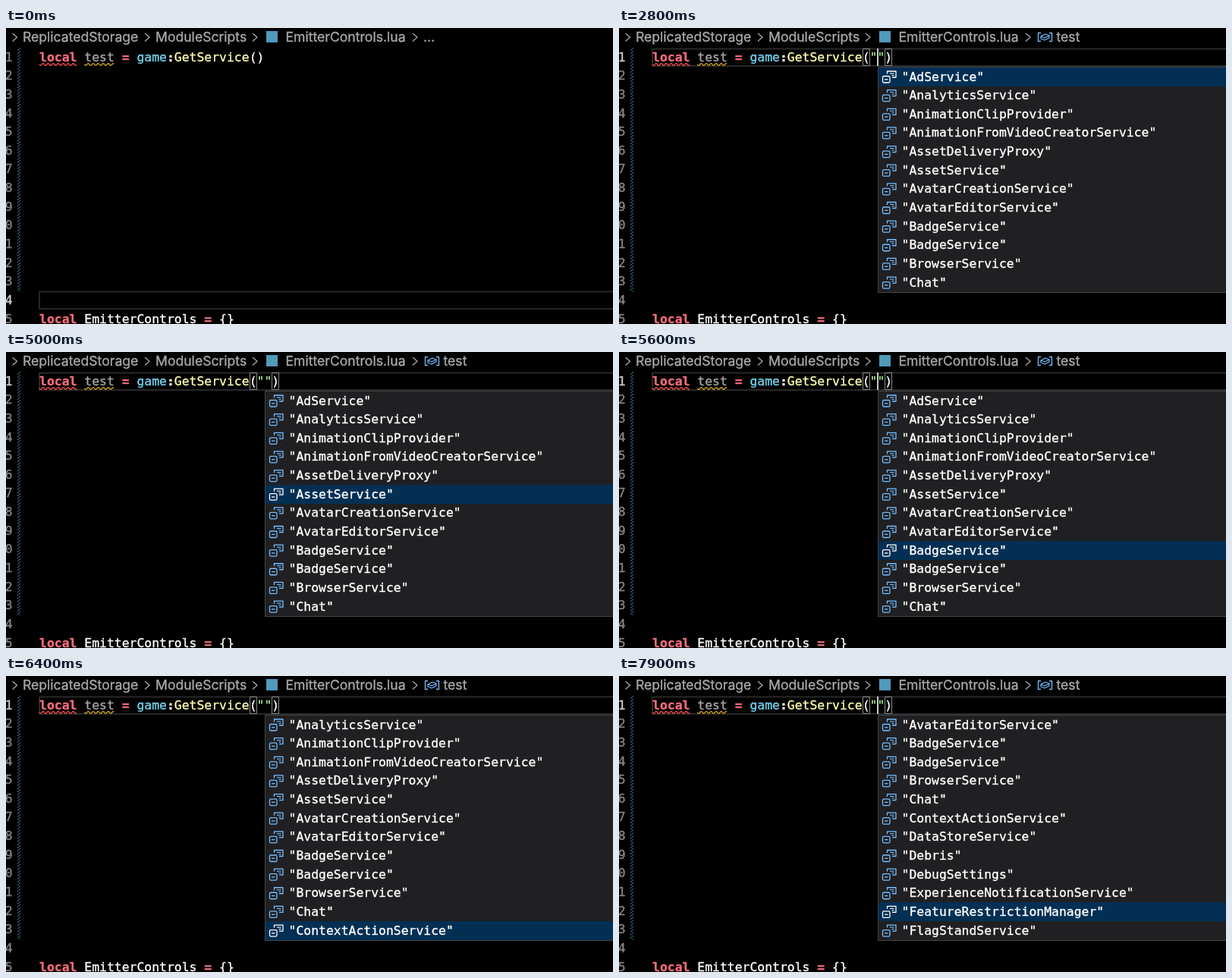
Animation, 800 px wide and 390 px high, one loop 8 s. Source, as an HTML page with a canvas:

```html
<!DOCTYPE html>
<html lang="en">
<head>
<meta charset="utf-8">
<title>Service autocomplete</title>
<style>
html, body { margin: 0; width: 100%; height: 100%; overflow: hidden; background: #000; }
canvas { display: block; }
</style>
</head>
<body>
<canvas id="stage" width="800" height="390"></canvas>
<script>
const ctx = document.getElementById('stage').getContext('2d');
const LOOP = 8000, ROW = 24.64, CHAR = 9.88, CODE_X = 44, TOP = 26, VISIBLE = 12;
const MONO = '16.41px "DejaVu Sans Mono", monospace';
const SANS = '17.6px Inter, sans-serif';
const PINK = '#f86d7c', BLUE = '#75beff', GREY = '#a9a9a9';
const CLICK = 1250, STEP_LEFT = 2100, QUOTE = 2450, MENU = 2550;

const services = ['AdService', 'AnalyticsService', 'AnimationClipProvider',
  'AnimationFromVideoCreatorService', 'AssetDeliveryProxy', 'AssetService',
  'AvatarCreationService', 'AvatarEditorService', 'BadgeService', 'BadgeService',
  'BrowserService', 'Chat', 'ContextActionService', 'DataStoreService', 'Debris',
  'DebugSettings', 'ExperienceNotificationService', 'FeatureRestrictionManager',
  'FlagStandService'];

const column = n => CODE_X + n * CHAR;
const rowTop = n => TOP + n * ROW;

// A hairline stroke gives the glyphs their slightly heavy weight.
function text(str, x, y, color, font = MONO) {
  ctx.font = font;
  ctx.fillStyle = ctx.strokeStyle = color;
  ctx.lineWidth = 0.35;
  ctx.fillText(str, x, y);
  ctx.strokeText(str, x, y);
}

function line(points, color, width = 1.5, close = false) {
  ctx.beginPath();
  points.forEach(([x, y]) => ctx.lineTo(x, y));
  if (close) ctx.closePath();
  ctx.strokeStyle = color;
  ctx.lineWidth = width;
  ctx.stroke();
}

function frame(x, y, w, h, color, width = 1, radius = 0) {
  ctx.beginPath();
  ctx.roundRect(x, y, w, h, radius);
  ctx.strokeStyle = color;
  ctx.lineWidth = width;
  ctx.stroke();
}

function code(row, parts) {
  let col = 0;
  for (const [str, color, bold] of parts) {
    text(str, column(col), rowTop(row) + 17.6, color, (bold ? 'bold ' : '') + MONO);
    col += str.length;
  }
}

function squiggle(from, to, color) {
  const points = [];
  for (let x = column(from); x <= column(to); x += 1) {
    points.push([x, 48 + 1.4 * Math.sin((x - CODE_X) * Math.PI / 3.3)]);
  }
  line(points, color, 1.4);
}

function breadcrumb(clicked) {
  for (const x of [8.5, 183, 325, 536]) {
    line([[x, 7], [x + 6, 12.2], [x, 17.4]], GREY, 1.3);
  }
  text('ReplicatedStorage', 22, 18, GREY, SANS);
  text('ModuleScripts', 197, 18, GREY, SANS);
  ctx.fillStyle = '#519aba';
  ctx.fillRect(343, 4, 15, 15);
  text('EmitterControls.lua', 368.5, 18, GREY, SANS);
  if (!clicked) return text('…', 550, 18, GREY, SANS);

  line([[556, 6.5], [552.5, 6.5], [552.5, 17.5], [556, 17.5]], BLUE, 1.3);
  line([[567, 6.5], [570.5, 6.5], [570.5, 17.5], [567, 17.5]], BLUE, 1.3);
  line([[556, 11], [562, 8], [567, 10], [567, 13], [561, 16], [556, 14]], BLUE, 1.2, true);
  line([[556, 11], [561, 13], [567, 10]], BLUE, 1.2);
  text('test', 576.5, 18, GREY, SANS);
}

function gutter(activeRow) {
  ctx.textAlign = 'right';
  for (let i = 0; i < 15; i++) {
    text(String(i + 1), 8.7, rowTop(i) + 17.6, i === activeRow ? '#d0d0d0' : '#858585');
  }
  ctx.textAlign = 'left';

  ctx.save();
  ctx.beginPath();
  ctx.rect(15, TOP, 4, 321);
  ctx.clip();
  for (let y = TOP; y < 354; y += 4.1) line([[14, y + 1], [20, y - 5]], '#438fb3', 1);
  ctx.restore();
}

function entryIcon(y, color) {
  line([[353.5, 60.5 + y], [353.5, 57 + y], [365, 57 + y], [365, 65 + y], [360, 65 + y]], color, 1.3);
  line([[357, 60 + y], [362.5, 60 + y]], color, 1.1);
  line([[359.5, 62.5 + y], [362.5, 62.5 + y]], color, 1.1);
  frame(347.5, 63.5 + y, 9.5, 8.5, color, 1.3, 1.5);
  line([[350, 67.8 + y], [354.5, 67.8 + y]], color, 1.3);
}

// Steady key presses, then faster ones, and finally one press back up.
function selectedAt(t) {
  if (t < 4000) return 0;
  if (t < 6200) return 1 + Math.floor((t - 4000) / 220);
  if (t >= 7500) return 17;
  return Math.min(18, 11 + Math.floor((t - 6200) / 125));
}

function menu(t) {
  const selected = selectedAt(t);
  const first = Math.max(0, (t < 7500 ? selected : 18) - VISIBLE + 1);
  ctx.fillStyle = '#202023';
  ctx.fillRect(341, 51, 460, 298);
  for (let i = 0; i < VISIBLE; i++) {
    const y = i * ROW, current = first + i === selected;
    if (current) {
      ctx.fillStyle = '#022f53';
      ctx.fillRect(342, Math.round(51.6 + y), 458, 25);
    }
    entryIcon(y, current ? '#fff' : BLUE);
    text(`"${services[first + i]}"`, 372.5, 69.5 + y, '#fff');
  }
  frame(341.5, 51.5, 460, 297, '#454548');
}

function pointer(t) {
  if (t < 600 || t >= QUOTE) return;
  const p = Math.min(1, (t - 600) / 550), left = (1 - p) ** 3;
  ctx.save();
  ctx.translate(441 + 110 * left, 33 + 358 * left);
  const outline = [[0, 0], [0, 20], [4.5, 16], [8, 24], [11.5, 22.5], [8.2, 14.8], [14, 14.5]];
  line(outline, '#fff', 2.4, true);
  ctx.fillStyle = '#000';
  ctx.fill();
  ctx.restore();
}

function caret(t) {
  const clicked = t >= CLICK;
  const start = t >= QUOTE ? QUOTE : t >= STEP_LEFT ? STEP_LEFT : clicked ? CLICK : -900;
  if ((t - start) % 1000 >= 500) return;
  const col = !clicked ? 0 : t < STEP_LEFT ? 30 : t < QUOTE ? 29 : 30;
  ctx.fillStyle = '#c8c8c8';
  ctx.fillRect(Math.round(column(col)), Math.round(rowTop(clicked ? 0 : 13)) + 1, 2, 23);
}

// Adjacent brackets share one outline.
function bracketOutlines(quoted) {
  const spans = quoted ? [[28, 29], [31, 32]] : [[28, 30]];
  for (const [from, to] of spans) {
    frame(Math.round(column(from)) + 0.5, 27.5, Math.round((to - from) * CHAR) - 1, 22, '#888');
  }
}

function draw(t) {
  const clicked = t >= CLICK, quoted = t >= QUOTE;
  const activeRow = clicked ? 0 : 13;
  ctx.fillStyle = '#000';
  ctx.fillRect(0, 0, 800, 390);

  breadcrumb(clicked);
  gutter(activeRow);
  frame(CODE_X, Math.round(rowTop(activeRow)) + 1.5, 760, 22.5, '#282828', 2);

  if (clicked) bracketOutlines(quoted);
  code(0, [['local', PINK, true], [' test ', '#a5a5a5'], ['=', PINK, true],
    [' game', '#76d8f4'], [':', '#fff', true], ['GetService', '#fdfbac'], ['(', '#fff'],
    [quoted ? '""' : '', '#adf195'], [')', '#fff']]);
  squiggle(0, 5, '#f14c4c');
  squiggle(6, 10, '#c09a20');
  code(14, [['local', PINK, true], [' EmitterControls ', '#fff'], ['=', PINK, true], [' {}', '#fff']]);

  caret(t);
  if (t >= MENU) menu(t);
  pointer(t);
}

ctx.lineJoin = 'round';
const began = performance.now();
function tick() {
  draw((performance.now() - began) % LOOP);
  requestAnimationFrame(tick);
}
tick();
</script>
</body>
</html>
```
